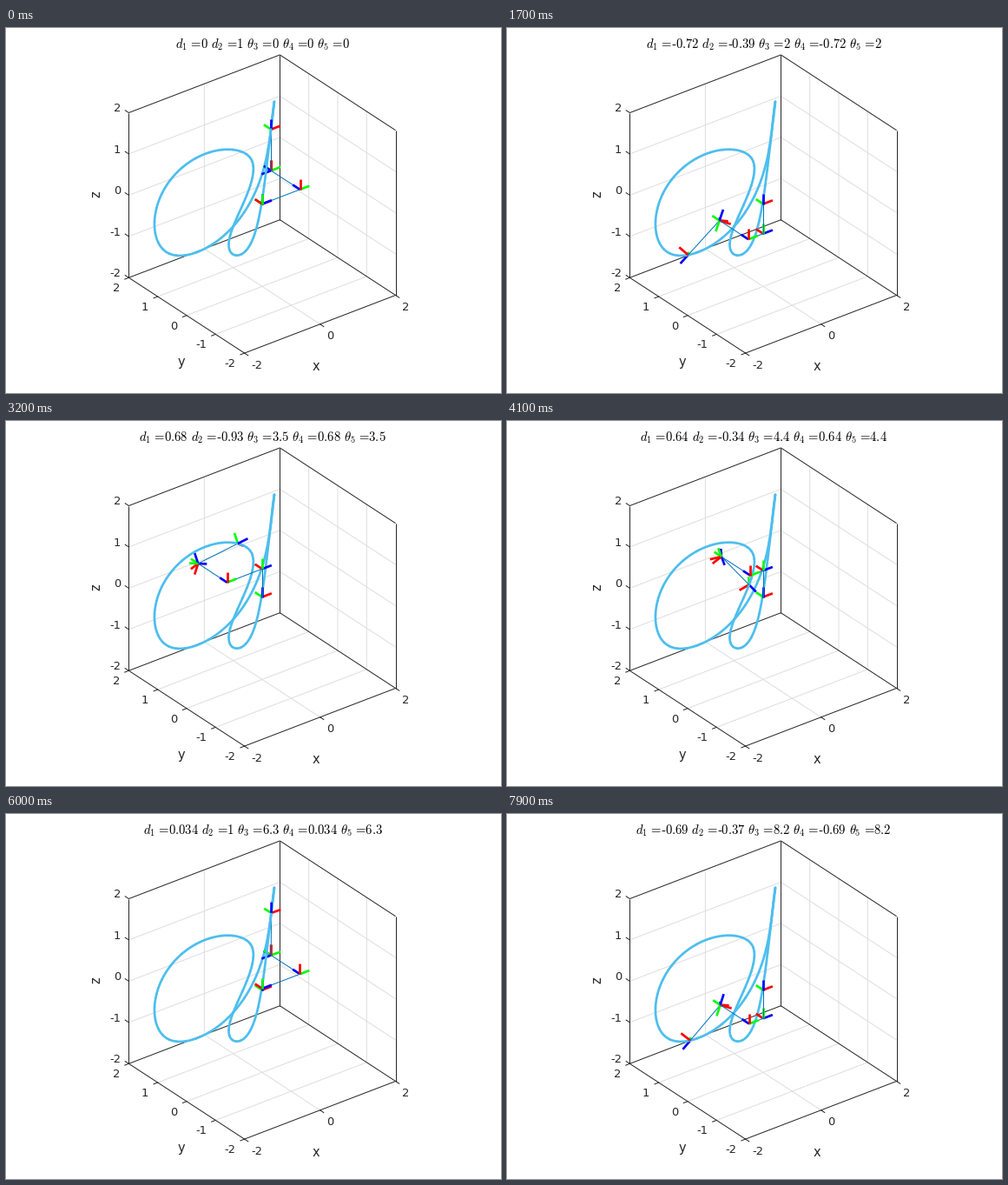
Animation of 570 by 420 pixels, one loop 8000 ms. Source, as a matplotlib script:

```python
import numpy as np
import matplotlib.pyplot as plt
from matplotlib.animation import FuncAnimation

W, H, DPI = 570, 420, 100
FRAMES, STEP_MS = 80, 100
INK = "#262626"
PX = 72 / DPI  # points per pixel

plt.rcParams["font.family"] = "DejaVu Sans"
plt.rcParams["mathtext.fontset"] = "cm"

# Orthographic projection of the cube [-2, 2]^3
ORIGIN = np.array([295.0, 202.5])
BASIS = np.array([[43.5, -16.65], [-33.3, -21.7], [0, -47.45]])
TO_CAMERA = np.array([-0.527, -0.687, 0.5])

# Simulation clock: runs close to real time with slight jitter
CLOCK_FRAME = [0, 1, 13, 17, 28, 32, 41, 45, 51, 68, 79]
CLOCK_TIME = [0, 0.04, 1.54, 1.973, 3.1, 3.5155, 4.365, 4.75, 5.3636, 7.133, 8.2348]


def project(points):
    return ORIGIN + np.asarray(points, float) @ BASIS


def depth(points):
    """Draw order of a short line: nearer to the camera is higher."""
    return 10 + np.mean(points, axis=0) @ TO_CAMERA


def link(theta, d, alpha):
    """Denavit-Hartenberg transform with zero link length."""
    c, s, ca, sa = np.cos(theta), np.sin(theta), np.cos(alpha), np.sin(alpha)
    return np.array([[c, -s * ca, s * sa, 0],
                     [s, c * ca, -c * sa, 0],
                     [0, sa, ca, d],
                     [0, 0, 0, 1]])


def joints(t):
    return np.sin(2 * t), np.cos(t), t, np.sin(2 * t), t


def arm(t):
    """Poses of the base, the four inner joints and the tool."""
    d1, d2, th3, th4, th5 = joints(t)
    q = np.pi / 2
    steps = [link(q, d1, q), link(q, d2, q), link(th3, 1, q),
             link(th4, 0, -q), link(th5 + q, 0, q) @ link(0, 1, 0)]
    poses = [np.eye(4)]
    for step in steps:
        poses.append(poses[-1] @ step)
    return poses


def title_text(t):
    names = ["d_1", "d_2", r"\theta_3", r"\theta_4", r"\theta_5"]
    parts = []
    for name, value in zip(names, joints(t)):
        number = f"{value:.2g}".replace("-", "\u2010")
        parts.append(name + r"\hspace{0.117}=\hspace{-0.2}\mathrm{" + number + "}")
    return "$" + r"\hspace{0.38}".join(parts) + "$"


fig = plt.figure(figsize=(W / DPI, H / DPI), dpi=DPI, facecolor="white")
ax = fig.add_axes([0, 0, 1, 1])
ax.set_xlim(0, W)
ax.set_ylim(H, 0)
ax.axis("off")


def line3(points, color, width, z, cap="butt"):
    ax.plot(*project(points).T, color=color, lw=width * PX, zorder=z,
            solid_capstyle=cap, solid_joinstyle="round")


def label(x, y, text, size=13, ha="center", **kw):
    ax.text(x, y, text, fontsize=size * PX, color=INK, ha=ha,
            va="center_baseline", **kw)


def tick(point, direction):
    a = project(point)
    v = np.array(direction) @ BASIS
    b = a + 5 * v / np.hypot(*v)
    ax.plot([a[0], b[0]], [a[1], b[1]], color=INK, lw=PX, zorder=2)


def draw_box():
    grid = "#dedede"
    for v in (-1, 0, 1):
        line3([(-2, v, -2), (2, v, -2), (2, v, 2)], grid, 1, 1)
        line3([(-2, 2, v), (2, 2, v), (2, -2, v)], grid, 1, 1)
    line3([(0, -2, -2), (0, 2, -2), (0, 2, 2)], grid, 1, 1)

    # One line per edge, so that upright edges stay crisp
    ring = [(-2, -2, -2), (2, -2, -2), (2, -2, 2), (2, 2, 2),
            (-2, 2, 2), (-2, 2, -2), (-2, -2, -2)]
    edges = list(zip(ring, ring[1:]))
    edges += [((2, 2, -2), end) for end in ((-2, 2, -2), (2, -2, -2), (2, 2, 2))]
    for edge in edges:
        line3(edge, INK, 1, 2)

    for v in (-2, -1, 0, 1, 2):
        tick((-2, 2, v), (0, 1, 0))
        tick((-2, v, -2), (-1, 0, 0))
        x, y = project((-2, 2, v))
        label(x - 9.3, y - 6, str(v), ha="right")
        x, y = project((-2, v, -2))
        label(x - 10.3, y + 11, str(v), ha="right")
    for v in (-2, 0, 2):
        tick((v, -2, -2), (0, -1, 0))
        x, y = project((v, -2, -2))
        label(x + 7.6, y + 12.4, str(v), ha="left")

    label(356.6, 388, "x", 14.6)
    label(202, 383, "y", 14.6)
    ax.text(104, 191.2, "z", fontsize=14.6 * PX, color=INK, rotation=90,
            ha="center", va="center")


def draw_path(pieces=60, detail=5):
    ts = np.linspace(0, 2 * np.pi, pieces * detail + 1)
    path = np.array([arm(t)[-1][:3, 3] for t in ts])
    for i in range(0, pieces * detail, detail):
        piece = path[i:i + detail + 1]
        line3(piece, "#4dbeee", 2.7, depth(piece), "round")


draw_box()
draw_path()

title = ax.text(295.5, 23.2, "", fontsize=14.67 * PX, color="black",
                ha="center", va="baseline")
links = [ax.plot([], [], color="#0072bd", lw=PX)[0] for _ in range(5)]
triads = [[ax.plot([], [], color=c, lw=2.7 * PX, solid_capstyle="butt")[0]
           for c in ("#ff0000", "#00ff00", "#0000ff")] for _ in range(6)]


def place(line, a, b):
    line.set_data(*project([a, b]).T)
    line.set_zorder(depth([a, b]))


def update(n):
    t = np.interp(n, CLOCK_FRAME, CLOCK_TIME)
    poses = arm(t)
    title.set_text(title_text(t))
    origins = [p[:3, 3] for p in poses]
    for line, a, b in zip(links, origins, origins[1:]):
        place(line, a, b)
    for pose, o, axes in zip(poses, origins, triads):
        for k, axis in enumerate(axes):
            place(axis, o, o + 0.25 * pose[:3, k])
    return [title, *links]


anim = FuncAnimation(fig, update, frames=FRAMES, interval=STEP_MS,
                     repeat=True, repeat_delay=0, blit=False)
plt.show()
```
